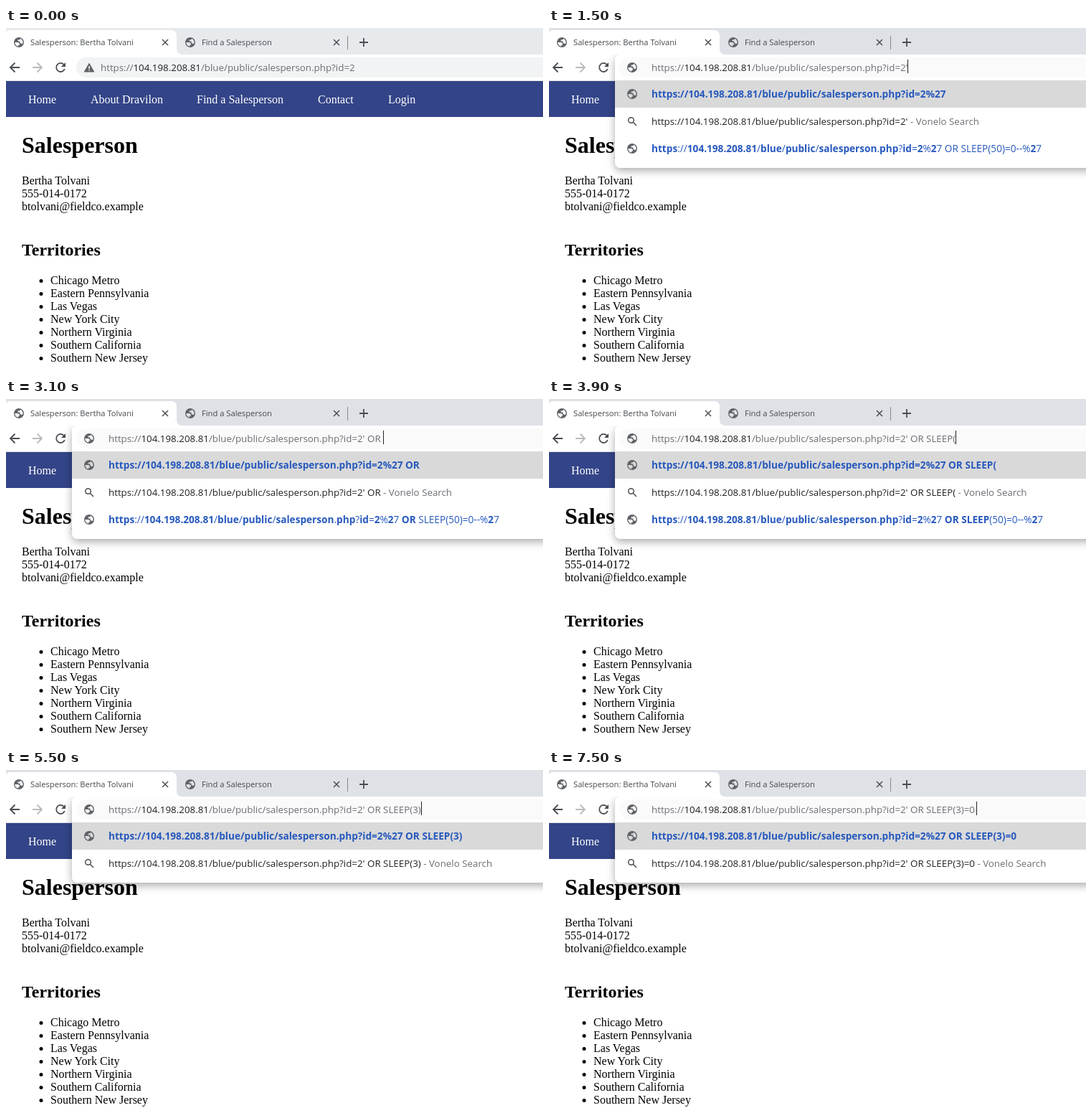
Recreate the animation shown at these times as an HTML page. Size 749 px wide and 478 px high, loop 8000 ms.

```html
<!DOCTYPE html>
<html lang="en">
<head>
<meta charset="utf-8">
<title>Typing in the address bar</title>
<style>
  html, body { margin: 0; width: 100%; height: 100%; overflow: hidden; background: #fff; }
  svg { display: block; }
  text { white-space: pre; }
  .ui { font-family: "Open Sans", "Noto Sans", sans-serif; font-size: 13.33px; fill: #202124; }
  .ui.tab { font-size: 11.2px; fill: #45494d; }
  .ui.link { font-size: 13.63px; fill: #2759bd; }
  .grey { fill: #6a6e73; }
  .page { font-family: "Liberation Serif", "Times New Roman", serif; font-size: 16px; }
  .h1 { font-size: 32px; font-weight: 700; }
  .h2 { font-size: 24px; font-weight: 700; }
  .line { fill: none; stroke: #4a4d51; stroke-width: 1.8; }
  .thin { stroke-width: 1.5; }
  .bold { font-weight: 700; }
</style>
</head>
<body>
<svg width="749" height="478" viewBox="0 0 749 478">
  <defs>
    <path id="globe" fill="#5f6368" fill-rule="evenodd" transform="scale(.7) translate(-12 -12)"
      d="M2 12a10 10 0 1 0 20 0a10 10 0 1 0-20 0Z
         M4 12H9A4.5 4.5 0 0 1 13.5 16.5V17H11V19.9A8 8 0 0 1 4 12Z
         M15 4.6A8 8 0 0 1 19.5 14.5H16L14 12V10H10V7H12Q15 7 15 4.6Z"/>
    <path id="cross" d="M-4-4L4 4M4-4L-4 4"/>
    <filter id="shadow" x="-10%" y="-20%" width="120%" height="150%">
      <feDropShadow dx="0" dy="4" stdDeviation="6" flood-opacity=".33"/>
    </filter>
    <clipPath id="belowTabs"><path d="M0 37H749V478H0Z"/></clipPath>
  </defs>
  <rect id="strip" width="749" height="37"/>
  <path fill="#fff" d="M0 37V7Q1 3 6 3H230Q238 3 238 11V29Q238 37 246 37Z"/>
  <g id="chrome"></g>
  <g id="page" class="page"></g>
  <g id="bar"></g>
</svg>
<script>
const LOOP = 8000;
const HOST = "104.198.208.81";
const PATH = "/blue/public/salesperson.php?id=2";
const TYPED = "' OR SLEEP(3)=0";
// start time, typed characters, caret x
const KEYS = [
  [1500, 1, 500], [2100, 3, 514], [2300, 4, 523], [3100, 5, 526],
  [3300, 6, 534], [3500, 8, 548], [3700, 10, 562], [3900, 11, 567],
  [4300, 12, 573], [4700, 13, 579], [6100, 14, 587], [6500, 15, 596]
];
const CARET_OFF = [[0, 300], [500, 1100], [2500, 3100], [5100, 5500], [6900, 7500]];

const $ = id => document.getElementById(id);
const text = (x, y, s, cls = "") => `<text x="${x}" y="${y}" class="${cls}">${s}</text>`;
const span = (s, cls) => `<tspan class="${cls}">${s}</tspan>`;
const bold = s => span(s, "bold");
const icon = (id, x, y, cls = "") => `<use href="#${id}" x="${x}" y="${y}" class="${cls}"/>`;
const rect = (x, y, w, h, fill, more = "") =>
  `<rect x="${x}" y="${y}" width="${w}" height="${h}" fill="${fill}" ${more}/>`;

function drawChrome() {
  $("chrome").innerHTML =
    icon("globe", 18, 20) + icon("globe", 257, 20) +
    text(34, 24, "Salesperson: Bertha Tolvani", "ui tab") +
    text(273, 24, "Find a Salesperson", "ui tab") +
    icon("cross", 222, 20, "line thin") + icon("cross", 461, 20, "line thin") +
    rect(476, 11, 1, 19, "#85888c") +
    `<path class="line" d="M493 20H505M499 14V26"/>` +
    rect(0, 37, 749, 37, "#fff") + rect(0, 73, 749, 1, "#dcdee1") +
    `<path class="line" d="M19 55H6M12.5 48.5L6 55L12.5 61.5"/>
     <path class="line" style="stroke:#b9bbbe" d="M37 55H50M43.5 48.5L50 55L43.5 61.5"/>
     <path class="line" d="M80.5 50.8A6 6 0 1 0 81.8 57"/>
     <path fill="#4a4d51" d="M83 48V54H77Z"/>`;
}

function drawPage() {
  const nav = [[31, "Home"], [118, "About Dravilon"], [266, "Find a Salesperson"], [435, "Contact"], [533, "Login"]];
  const contact = ["Bertha Tolvani", "555-014-0172", "btolvani@fieldco.example"];
  const places = ["Chicago Metro", "Eastern Pennsylvania", "Las Vegas", "New York City",
    "Northern Virginia", "Southern California", "Southern New Jersey"];
  $("page").innerHTML =
    rect(0, 74, 749, 50, "#334488") +
    `<g fill="#fff">${nav.map(([x, s]) => text(x, 105, s)).join("")}</g>` +
    text(22, 174, "Salesperson", "h1") + text(22, 317, "Territories", "h2") +
    contact.map((s, i) => text(22, 218 + 18 * i, s)).join("") +
    places.map((s, i) => `<circle cx="49" cy="${352.5 + 18 * i}" r="2.5"/>` + text(62, 357 + 18 * i, s)).join("");
}

const address = (x, tail) =>
  text(x, 60, span("https://", "grey") + HOST + span(PATH + tail, "grey"), "ui");

function idleBar(focused) {
  const pill = focused
    ? rect(98, 41, 700, 28, "#fff", 'rx="14" stroke="#b4cdf6" stroke-width="2"')
    : rect(98, 41, 700, 28, "#f1f3f4", 'rx="14"');
  return pill +
    `<path fill="#5f6368" d="M116 48.5L123.5 61.5H108.5Z"/>` +
    rect(115.3, 53, 1.5, 4, "#fff") + rect(115.3, 58, 1.5, 1.5, "#fff") +
    address(132, "");
}

// A past address with the words typed so far in bold
function history(typed) {
  const rest = " OR SLEEP(50)=0--%";
  const hit = Math.min(typed.length - 1, 9);
  const parts = PATH.split(/(\w+)/).map(s => /\w/.test(s) ? bold(s) : s).join("");
  return bold("https") + "://" + bold(HOST) + parts + "%" + bold(2) + "7" +
    bold(rest.slice(0, hit)) + rest.slice(hit) + bold(2) + "7";
}

function dropdown(typed) {
  const rows = typed.length < 12 ? 3 : 2;
  const shown = typed.trimEnd();
  const url = "https://" + HOST + PATH;
  let out = `<g clip-path="url(#belowTabs)">` +
    rect(92, 37, 720, 44 + 38 * rows, "#fff", 'rx="8" filter="url(#shadow)"') + "</g>" +
    rect(98, 41, 700, 28, "#fafafb", 'rx="14"') +
    rect(92, 73, 657, 38, "#d9d9d9") +
    icon("globe", 116, 55) + icon("globe", 116, 92) +
    `<g class="line thin"><circle cx="114.5" cy="128.5" r="3.8"/><path d="M117.3 131.3L122 136"/></g>` +
    address(143, typed) +
    text(143, 97, url + shown.replace("'", "%27"), "ui link bold") +
    text(143, 135, url + shown + span(" - Vonelo Search", "grey"), "ui");
  if (rows === 3) out += icon("globe", 116, 168) + text(143, 173, history(typed), "ui link");
  return out;
}

let last = "";
function frame(now) {
  const t = now % LOOP;
  const key = KEYS.filter(k => k[0] <= t).pop();
  const focused = t >= 300;
  const caret = !CARET_OFF.some(([a, b]) => t >= a && t < b);
  const state = [key, focused, caret].join();
  if (state !== last) {
    last = state;
    $("strip").setAttribute("fill", focused ? "#dee1e6" : "#e7eaed");
    $("bar").innerHTML = (key ? dropdown(TYPED.slice(0, key[1])) : idleBar(focused)) +
      (caret ? rect(key ? key[2] : 486, 44, 1, 19, "#202124") : "");
  }
  requestAnimationFrame(frame);
}

drawChrome();
drawPage();
frame(0);
</script>
</body>
</html>
```
